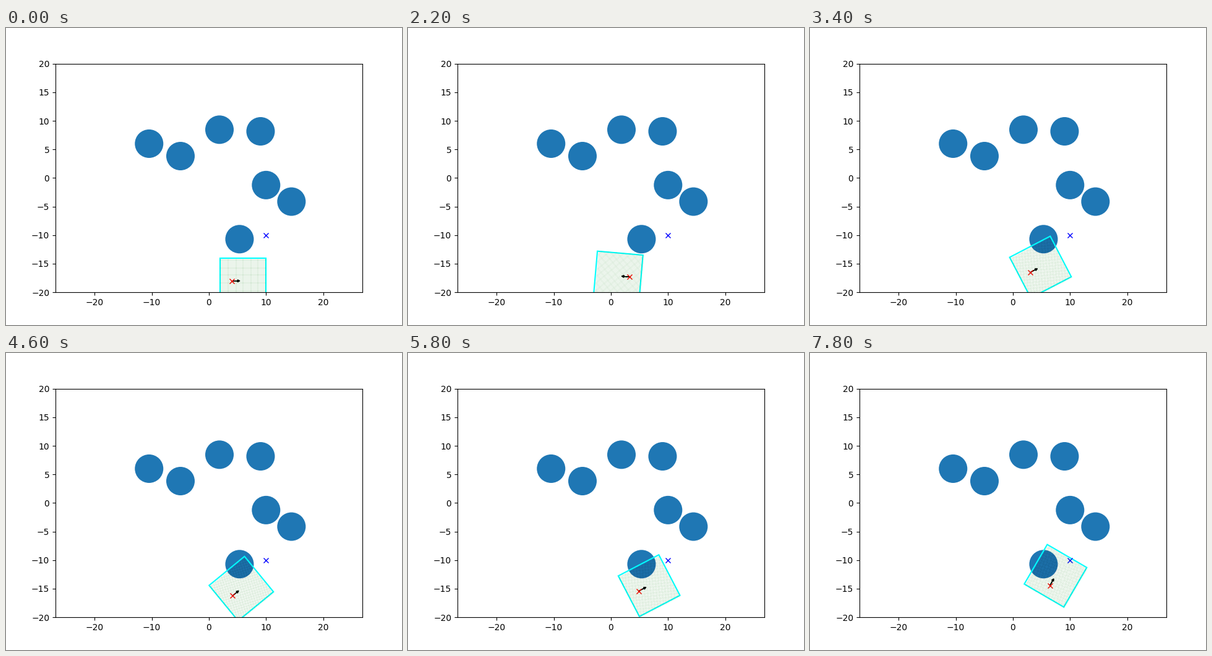
Recreate the animation shown at these times as a matplotlib script. Size 640 by 480 pixels, loop 8000 ms.

```python
import numpy as np
import matplotlib.pyplot as plt
from matplotlib.animation import FuncAnimation

STEPS = 40
STEP_MS = 200
SPEED = 0.19
ACCEL = 0.035
RADIUS = 2.49
CELL = 0.2
GOAL = (10, -10)
OBSTACLES = np.array([
    (-10.47, 6.0), (-4.98, 3.83), (1.84, 8.45), (9.03, 8.16),
    (9.99, -1.24), (14.43, -4.13), (5.35, -10.7),
])

# The robot swings between these headings (step, degrees).
SWINGS = np.array([(0, 0), (9.6, 184), (19.5, 0), (25.8, 67), (31.3, 4),
                   (37.8, 67), (43, 10)])
# Way points (step, x, y) that the dead reckoning is pulled onto.
FIXES = np.array([(0, 4, -18), (5, 4.22, -17.62), (11, 3.26, -17.3),
                  (17, 3.04, -16.5), (23, 4.11, -16.24), (29, 4.9, -15.38),
                  (39, 6.44, -14.46)])


def headings(steps):
    times, angles = SWINGS.T
    phase = np.interp(steps, times, np.arange(len(times)))
    k = phase.astype(int)
    ease = (1 - np.cos(np.pi * (phase - k))) / 2
    return np.radians(angles[k] + (angles[k + 1] - angles[k]) * ease)


def drive(steps, yaw):
    speed = np.minimum(SPEED, ACCEL * steps)
    heading = np.column_stack([np.cos(yaw), np.sin(yaw)])
    path = np.cumsum(speed[:, None] * heading, axis=0)
    at = FIXES[:, 0].astype(int)
    drift = FIXES[:, 1:] - path[at]
    for k in range(2):
        path[:, k] += np.interp(steps, at, drift[:, k])
    return path


def to_world(points, pos, yaw):
    c, s = np.cos(yaw), np.sin(yaw)
    return pos + points @ np.array([[c, s], [-s, c]])


steps = np.arange(STEPS)
YAW = headings(steps)
PATH = drive(steps, YAW)

# Local map in robot coordinates: x forward, y left.
side = np.arange(40) * CELL
CELLS = np.stack(np.meshgrid(side - 2, side - 4), axis=-1).reshape(-1, 2)
CORNERS = np.array([(-2, -4), (6, -4), (6, 4), (-2, 4)])

fig, ax = plt.subplots(figsize=(6.4, 4.8), dpi=100)
ax.set_xlim(-20, 20)
ax.set_ylim(-20, 20)
ax.set_aspect("equal", adjustable="datalim")

for center in OBSTACLES:
    ax.add_patch(plt.Circle(center, RADIUS))

robot, = ax.plot([], [], "xr")
ax.plot(*GOAL, "xb")
arrow = ax.arrow(4, -18, 1, 0, width=0.001, head_length=0.4, head_width=0.4,
                 color="black")
border = plt.Polygon(CORNERS, fill=False, ec="cyan", lw=1.5)
ax.add_patch(border)
free, = ax.plot([], [], ".g", ms=0.1)
blocked, = ax.plot([], [], ".k", ms=0.1)
ax.set_xlim(-20, 20)
ax.set_ylim(-20, 20)


def update(i):
    pos, yaw = PATH[i], YAW[i]
    robot.set_data([pos[0]], [pos[1]])
    arrow.set_data(x=pos[0], y=pos[1], dx=np.cos(yaw), dy=np.sin(yaw))
    border.set_xy(to_world(CORNERS, pos, yaw))

    cells = to_world(CELLS, pos, yaw)
    gaps = np.linalg.norm(cells[:, None] - OBSTACLES, axis=2)
    hit = gaps.min(axis=1) <= RADIUS
    free.set_data(*cells[~hit].T)
    blocked.set_data(*cells[hit].T)
    return robot, arrow, border, free, blocked


anim = FuncAnimation(fig, update, frames=STEPS, interval=STEP_MS,
                     repeat=True, repeat_delay=0)
plt.show()
```
